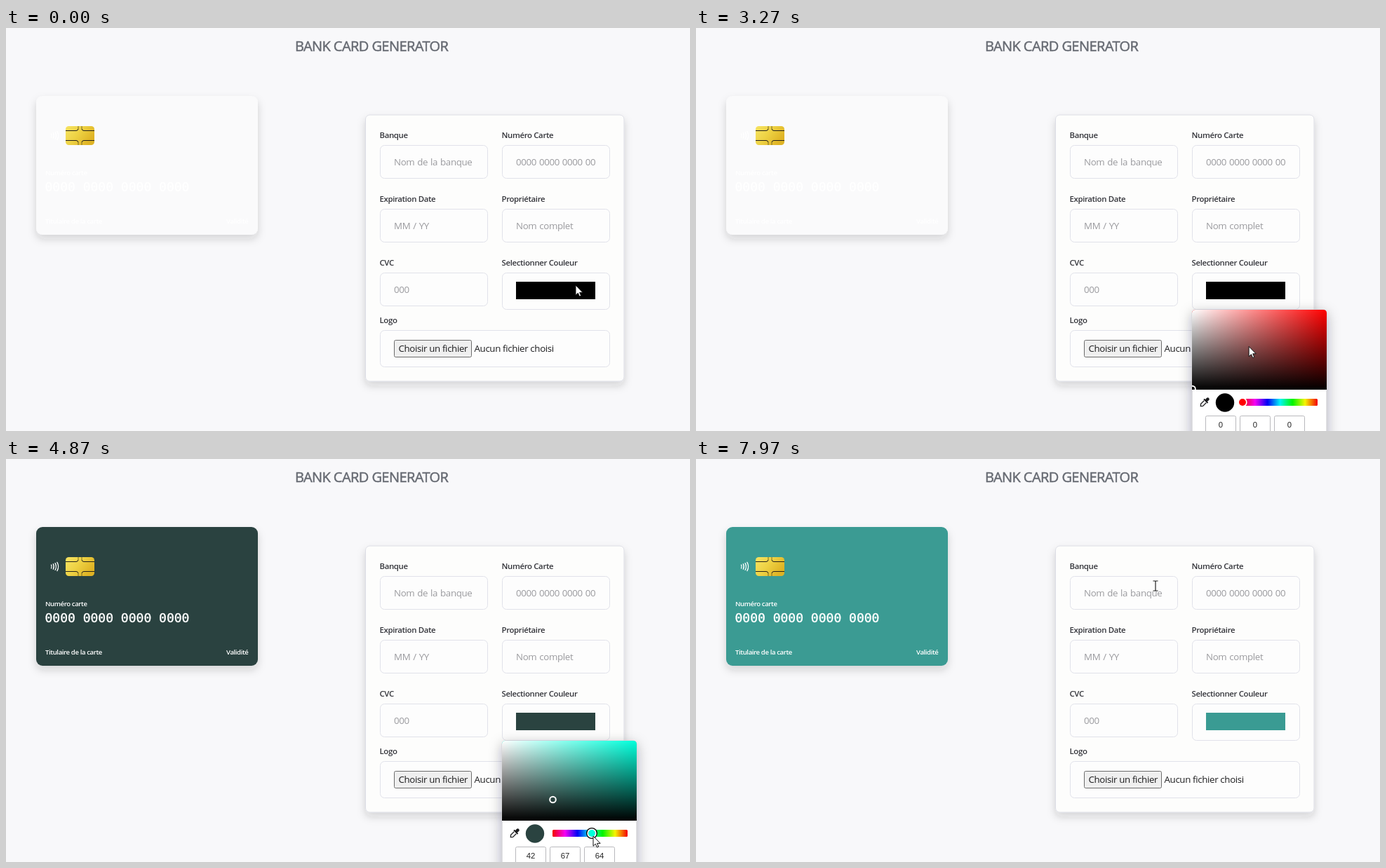
These frames come from a looping animation (975 by 575 pixels, 8000 ms). An HTML page:

```html
<!DOCTYPE html>
<html lang="fr">
<head>
<meta charset="utf-8">
<title>Bank card generator</title>
<style>
  html, body { margin: 0; width: 100%; height: 100%; overflow: hidden; background: #f8f8fa; }
  svg { display: block; width: 975px; height: 575px; font-family: "Open Sans", "Noto Sans", sans-serif; }
  text { white-space: pre; }
  .title { font-size: 20px; letter-spacing: -.58px; fill: #676b73; stroke: #676b73; stroke-width: .5px; }
  .label { font-size: 11.4px; font-weight: 600; letter-spacing: -.35px; fill: #33343a; }
  .hint, .file { font-size: 13.3px; letter-spacing: -.35px; fill: #9a9a9e; }
  .hint { word-spacing: .8px; }
  .file { fill: #1c1c1e; }
  .field { fill: #fdfdfd; stroke: #e1e2ea; }
  .small { font-size: 9.6px; font-weight: 600; letter-spacing: -.4px; }
  .digits { font: 18px "DejaVu Sans Mono", "Noto Sans Mono", monospace; stroke: #fff; stroke-width: .4px; }
  .value { font: 11.3px "Liberation Sans", sans-serif; fill: #222; text-anchor: middle; }
</style>
</head>
<body>
<svg viewBox="0 0 975 575">
  <defs>
    <filter id="soft" x="-20%" y="-20%" width="140%" height="150%">
      <feDropShadow dx="0" dy="6" stdDeviation="6" flood-color="#202030" flood-opacity=".17"/>
    </filter>
    <filter id="deep" x="-30%" y="-30%" width="160%" height="160%">
      <feDropShadow dx="0" dy="5" stdDeviation="9" flood-color="#202030" flood-opacity=".3"/>
    </filter>
    <linearGradient id="gold" x2="1" y2=".5">
      <stop stop-color="#f6e363"/><stop offset=".5" stop-color="#eed244"/><stop offset="1" stop-color="#dfb324"/>
    </linearGradient>
    <linearGradient id="white"><stop stop-color="#fff"/><stop offset="1" stop-color="#fff" stop-opacity="0"/></linearGradient>
    <linearGradient id="black" x2="0" y2="1"><stop stop-opacity="0"/><stop offset="1"/></linearGradient>
    <linearGradient id="rainbow"></linearGradient>
    <clipPath id="numberClip"><rect x="727" y="175" width="113" height="32"/></clipPath>
    <clipPath id="areaClip"><path d="M707 516V407q0-5 5-5H894q5 0 5 5V516z"/></clipPath>
  </defs>

  <rect width="975" height="575" fill="#f8f8fa"/>
  <text class="title" x="412" y="33">BANK CARD GENERATOR</text>

  <g fill="#fff">
    <rect id="card" x="43" y="97" width="316" height="198" rx="9" filter="url(#soft)"/>
    <path d="M64.5 151q1 2.500 0 5M67.300 149.800q1.800 3.700 0 7.400M70.100 148.600q2.600 4.900 0 9.800M72.900 147.400q3.400 6.100 0 12.200"
          fill="none" stroke="#fff" stroke-width="1.300" stroke-linecap="round"/>
    <rect x="85" y="140" width="41" height="27" rx="4.500" fill="url(#gold)"/>
    <path d="M85 146.500H100q2.500 0 3-2.500M126 146.500H111q-2.500 0-3-2.500M85 160.500H100q2.500 0 3 2.500M126 160.500H111q-2.500 0-3 2.500"
          fill="none" stroke="#26221a"/>
    <path d="M103 140v4M108 140v4M103 163v4M108 163v4" stroke="#7a6a24"/>
    <text class="small" x="56" y="210">Numéro carte</text>
    <text class="digits" x="55.500" y="233">0000 0000 0000 0000</text>
    <text class="small" x="56" y="279">Titulaire de la carte</text>
    <text class="small" x="314" y="279">Validité</text>
  </g>

  <rect x="512.500" y="124" width="368.500" height="380" rx="6" fill="#fdfdfc" stroke="#dcdde5" filter="url(#soft)"/>
  <g id="form"></g>
  <rect x="553.500" y="445.500" width="110" height="24" rx="2" fill="#efefef" stroke="#6c6c6c"/>
  <text class="file" x="559.500" y="462">Choisir un fichier</text>
  <text class="file" x="667.500" y="462">Aucun fichier choisi</text>
  <rect id="swatch" x="727" y="362" width="113" height="25"/>

  <g id="picker">
    <path d="M707 590V407q0-5 5-5H894q5 0 5 5V590z" fill="#fff" stroke="#c6c6cc" filter="url(#deep)"/>
    <g clip-path="url(#areaClip)">
      <rect id="pure" x="707" y="402" width="192" height="114"/>
      <rect x="707" y="402" width="192" height="114" fill="url(#white)"/>
      <rect x="707" y="402" width="192" height="114" fill="url(#black)"/>
      <g id="marker" fill="none">
        <circle class="ring" r="6" stroke="#000" stroke-width="1.500"/>
        <circle r="4.300" stroke="#fff" stroke-width="2"/>
      </g>
    </g>
    <g transform="translate(725 534) rotate(45)" fill="#1b1b1d">
      <rect x="-2.200" y="-8.500" width="4.400" height="6" rx="2"/>
      <rect x="-4" y="-3.500" width="8" height="2" rx=".6"/>
      <path d="M-2.100-1V5.500L0 8L2.100 5.500V-1" fill="none" stroke="#1b1b1d" stroke-width="1.300"/>
    </g>
    <circle id="disc" cx="754" cy="534.500" r="13.200"/>
    <rect x="779" y="529" width="107" height="10" rx="1.500" fill="url(#rainbow)"/>
    <g id="thumb">
      <circle class="ring" r="8" fill="#000"/>
      <circle r="6.700" fill="#fff"/>
      <circle id="dot" r="5"/>
    </g>
    <g id="values"></g>
  </g>

  <path id="arrow" d="M0 0V14.300L3.300 11.200L5.500 16.100L7.700 15.100L5.600 10.400H10.100z" fill="#fff" stroke="#111"/>
  <path id="beam" d="M-3.500-7H-1Q0-7 0-6Q0-7 1-7H3.500M0-6V6M-3.500 7H-1Q0 7 0 6Q0 7 1 7H3.500" fill="none" stroke="#222" stroke-width="1.200"/>
</svg>
<script>
const LOOP = 8000;
const $ = id => document.getElementById(id);
const set = (el, attrs) => { for (const k in attrs) el.setAttribute(k, attrs[k]); };
const add = (parent, tag, attrs, text = '') => {
  const el = document.createElementNS('http://www.w3.org/2000/svg', tag);
  set(el, attrs);
  el.textContent = text;
  return parent.appendChild(el);
};

const AREA = { x: 707, y: 402, w: 192, h: 114 };
const HUE = { x: 779, y: 534, w: 107 };

// x, y, width, height, label, placeholder
const fields = [
  [533, 167, 153, 47, 'Banque', 'Nom de la banque'],
  [707, 167, 153, 47, 'Numéro Carte', '0000 0000 0000 0000'],
  [533, 258, 153, 47, 'Expiration Date', 'MM / YY'],
  [707, 258, 153, 47, 'Propriétaire', 'Nom complet'],
  [533, 349, 153, 47, 'CVC', '000'],
  [707, 349, 153, 52, 'Selectionner Couleur', ''],
  [533, 431, 327, 52, 'Logo', '']
];
for (const [x, y, w, h, label, hint] of fields) {
  add($('form'), 'text', { class: 'label', x: x - .5, y: y - 10.5 }, label);
  add($('form'), 'rect', { class: 'field', x: x + .5, y: y + .5, width: w, height: h, rx: 6 });
  if (!hint) continue;
  const g = add($('form'), 'g', label === 'Numéro Carte' ? { 'clip-path': 'url(#numberClip)' } : {});
  add(g, 'text', { class: 'hint', x: x + 20, y: y + 29 }, hint);
}
for (let i = 0; i <= 6; i++)
  add($('rainbow'), 'stop', { offset: i / 6, 'stop-color': `hsl(${360 - i * 60},100%,48%)` });
const values = [748, 797, 846].map(x => {
  add($('values'), 'rect', { x: x - 21.5, y: 553.5, width: 43, height: 30, rx: 2, fill: '#fff', stroke: '#b9b9bd' });
  return add($('values'), 'text', { class: 'value', x, y: 570 });
});

// pointer path: time, x, y
const path = [
  [0, 812, 367], [30, 812, 367], [330, 811, 373], [730, 811, 373], [1100, 811, 377],
  [1800, 811, 377], [2200, 809, 384], [2970, 793, 428], [3300, 788, 455], [3530, 786, 469.5],
  [3950, 779.5, 486], [4150, 779.5, 486], [4430, 781, 537], [4870, 837, 538], [5100, 837, 538],
  [5300, 835, 538], [5500, 835, 538], [5800, 805, 478], [6200, 820.6, 472], [6550, 827, 446.7],
  [6650, 827, 446.7], [6800, 835, 537], [6900, 836.6, 537], [7150, 690, 490], [7300, 690, 470],
  [7500, 688, 450], [7800, 662, 230], [7940, 655, 181], [8000, 655, 181]
];
const pointer = t => {
  const i = Math.max(1, path.findIndex(p => p[0] >= t));
  const [t0, x0, y0] = path[i - 1], [t1, x1, y1] = path[i];
  const k = (t - t0) / (t1 - t0), e = k * k * (3 - 2 * k);
  return { x: x0 + (x1 - x0) * e, y: y0 + (y1 - y0) * e };
};

const OPEN = 1930, CLOSE = 7230;
const areaDrags = [[3330, 4100], [5800, 6600]];
const hueDrags = [[4430, 5450], [6800, 6910]];

// pointer position of the latest drag, held after release
const dragged = (drags, t) => {
  const d = drags.filter(([from]) => t >= from).pop();
  return d && pointer(Math.min(t, d[1]));
};
const startOf = (drags, t) => Math.max(-1, ...drags.map(d => d[0]).filter(s => s <= t));

const hsv = (h, s, v) => [5, 3, 1].map(n => {
  const k = (n + h / 60) % 6;
  return Math.round(255 * v * (1 - s * Math.max(0, Math.min(k, 4 - k, 1))));
});
const move = (el, x, y) => el.setAttribute('transform', `translate(${x} ${y})`);
const show = (el, on) => el.setAttribute('visibility', on ? 'visible' : 'hidden');

function draw(t) {
  const p = pointer(t);
  const mark = dragged(areaDrags, t);
  const grip = dragged(hueDrags, t);
  const m = mark || { x: AREA.x + .5, y: AREA.y + AREA.h - 1 };
  const hx = grip ? Math.max(HUE.x, grip.x - 2) : HUE.x;
  const hue = 360 * (1 - (hx - HUE.x) / HUE.w);
  const rgb = mark
    ? hsv(hue, (m.x - AREA.x) / AREA.w, 1 - (m.y - AREA.y) / AREA.h)
    : [0, 0, 0];
  const color = `rgb(${rgb})`;
  const pure = `rgb(${hsv(hue, 1, 1)})`;

  set($('card'), { fill: mark ? color : '#fafafb' });
  set($('swatch'), { fill: color });
  set($('disc'), { fill: color });
  set($('pure'), { fill: pure });
  set($('dot'), { fill: pure });
  values.forEach((el, i) => { el.textContent = rgb[i]; });

  const a = startOf(areaDrags, t), h = startOf(hueDrags, t);
  $('picker').setAttribute('display', t >= OPEN && t < CLOSE ? 'inline' : 'none');
  $('marker').querySelector('.ring').setAttribute('opacity', a > h ? 1 : 0);
  $('thumb').querySelector('.ring').setAttribute('opacity', h > a ? 1 : 0);
  move($('marker'), m.x, m.y);
  move($('thumb'), hx, HUE.y);

  const typing = fields.some(([x, y, w, fh, , hint]) =>
    hint && p.x > x && p.x < x + w && p.y > y && p.y < y + fh);
  show($('arrow'), !typing);
  show($('beam'), typing);
  move($('arrow'), p.x, p.y);
  move($('beam'), p.x, p.y);
}

const start = performance.now();
function tick() {
  draw((performance.now() - start) % LOOP);
  requestAnimationFrame(tick);
}
tick();
</script>
</body>
</html>
```
